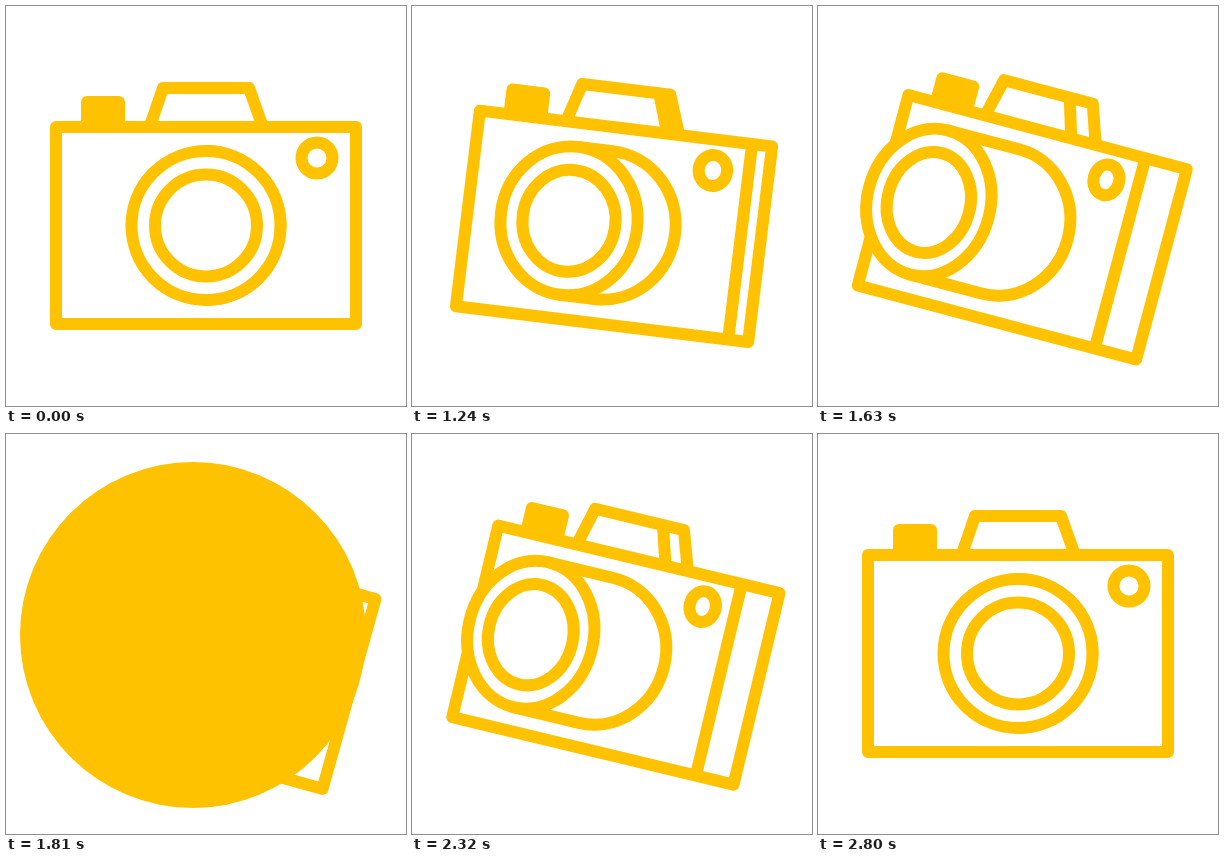
An HTML page for the animation above (2830 ms loop, 400 by 400 pixels).

```html
<!DOCTYPE html>
<html lang="en">
<head>
<meta charset="utf-8">
<title>Camera</title>
<style>
  html, body { margin: 0; width: 100%; height: 100%; overflow: hidden; background: #fff; }
  svg { display: block; width: 100%; height: 100%; }
  .line { fill: none; stroke: #ffc200; stroke-width: 12; stroke-linejoin: round; stroke-linecap: round; }
  .cover { fill: #fff; }
  .solid { fill: #ffc200; }
</style>
</head>
<body>
<svg viewBox="0 0 400 400">
  <g id="camera">
    <path id="hump" class="line"/>
    <rect id="button" class="solid" y="-129.5" width="44" height="34" rx="6"/>
    <path id="body" class="line"/>
    <ellipse id="finder" class="line" cy="-67.5" ry="15.5"/>
    <path id="barrel" class="line cover"/>
    <ellipse id="rim" class="line cover" ry="74.5"/>
    <ellipse id="glass" class="line" ry="51"/>
  </g>
  <circle id="flash" class="solid" cx="187" cy="201" r="173" opacity="0"/>
</svg>
<script>
  const LOOP = 2830, START = 1000, TURN = 900, STEP = 30;
  const $ = id => document.getElementById(id);
  const set = (id, attrs) => {
    for (const key in attrs) $(id).setAttribute(key, attrs[key]);
  };
  const clamp = v => Math.min(1, Math.max(0, v));

  // Cubic bezier easing (.33, 0, .1, 1), solved by bisection.
  function ease(x) {
    if (x <= 0 || x >= 1) return clamp(x);
    const curve = (s, a, b) => 3 * (1 - s) ** 2 * s * a + 3 * (1 - s) * s * s * b + s ** 3;
    let lo = 0, hi = 1;
    for (let i = 0; i < 24; i++) {
      const mid = (lo + hi) / 2;
      if (curve(mid, 0.33, 0.1) < x) lo = mid; else hi = mid;
    }
    return curve(lo, 0, 1);
  }

  // p = 0 faces the viewer, p = 1 is fully turned.
  function pose(p) {
    const mix = (a, b) => a + (b - a) * p;
    const side = mix(150, 143.75), edge = side - 45 * p;
    const front = -101.5 * p, back = -23.5 * p;
    const backRx = mix(74.5, 69);
    const humpTop = mix(43, 11), humpBase = mix(56, 22);

    set('camera', {
      transform: `translate(${mix(200, 204.5)} ${mix(219.5, 221.4)}) rotate(${15.65 * p})`
    });
    set('body', {
      d: `M${-side} -98.5H${side}V98.5H${-side}Z M${edge} -98.5V98.5`
    });
    set('hump', {
      d: `M${mix(-55.5, -64.5)} -101L${mix(-43, -56)} -137.5H${mix(43, 36)}L${mix(56, 48.5)} -101`
        + `M${humpTop} -137.5L${humpBase} -101`
    });
    set('button', { x: mix(-125, -121.5) });
    set('finder', { cx: mix(111, 67), rx: mix(15.5, 12.7) });
    set('barrel', {
      d: `M${front} -74.5H${back}A${backRx} 74.5 0 0 1 ${back} 74.5H${front}`
    });
    set('rim', { cx: front, rx: mix(74.5, 61) });
    set('glass', { cx: front, rx: mix(51, 41) });
  }

  function draw(now) {
    const time = now % LOOP;
    const t = START + Math.floor((time - START) / STEP + 1e-6) * STEP;
    const peak = START + TURN;
    pose(ease(1 - Math.abs(t - peak) / TURN));
    const glow = Math.min(clamp((t - 1720) / 90), clamp((1990 - t) / 150));
    set('flash', { opacity: glow });
  }

  const origin = performance.now();
  function tick() {
    draw(performance.now() - origin);
    requestAnimationFrame(tick);
  }
  tick();
</script>
</body>
</html>
```
